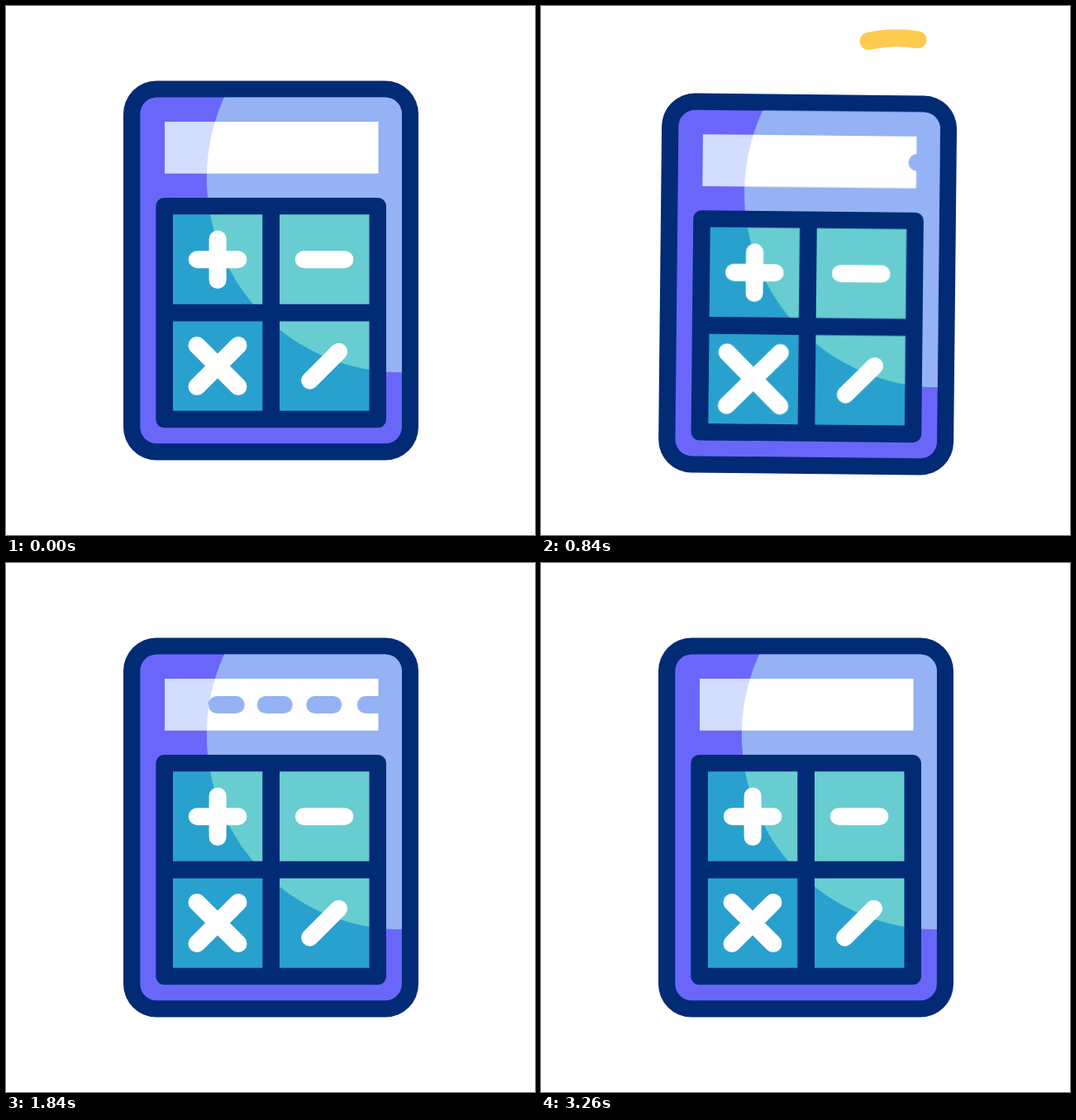
These frames come from a looping animation (640 by 640 pixels, 3460 ms). An HTML page:

```html
<!DOCTYPE html>
<html lang="en">
<head>
<meta charset="utf-8">
<title>Calculator</title>
<style>
  html, body { margin: 0; width: 100%; height: 100%; overflow: hidden; background: #fff; }
  svg { display: block; width: 100vw; height: 100vh; }

  svg { --loop: 3460ms; --ease: cubic-bezier(.333, 0, .667, 1); }
  .navy { fill: #022b76; }

  /* Unlit and lit colours of the same surfaces */
  #dim { --body: #6b66fa; --screen: #d3ddfe; --key: #28a1ce; }
  #lit { --body: #94b2f4; --screen: #fff; --key: #67cdd1; clip-path: url(#glow); }
  .body { fill: var(--body); }
  .screen { fill: var(--screen); }
  .keys { fill: var(--key); }

  .calc {
    transform-origin: 320.5px 525px;
    animation: hop var(--loop) var(--ease) infinite, tilt var(--loop) var(--ease) infinite;
  }
  @keyframes hop {
    0%, 6.65% { translate: 0 0; }
    14.65% { translate: 0 -52px; }
    23.58%, 27.89% { translate: 0 16.5px; }
    40.32%, 100% { translate: 0 0; }
  }
  @keyframes tilt {
    0%, 10.69% { rotate: 0deg; }
    19.94% { rotate: -4deg; }
    27.89% { rotate: 4deg; }
    40.32%, 100% { rotate: 0deg; }
  }

  /* Digits scroll across the screen */
  .digits { fill: var(--body); animation: scroll var(--loop) linear infinite; }
  @keyframes scroll {
    0%, 22.54% { transform: translateX(0); }
    94.22%, 100% { transform: translateX(-486.8px); }
  }

  /* Signs stretch one after another */
  .sign {
    fill: none; stroke: #fff; stroke-width: 21; stroke-linecap: round;
    vector-effect: non-scaling-stroke;
    transform-box: fill-box; transform-origin: center;
    animation: press var(--loop) var(--ease) calc(760ms + 244ms * var(--i)) infinite;
  }
  @keyframes press {
    0%, 7.23%, 100% { transform: scale(1); }
    3.61% { transform: scale(1.4); }
  }

  .swoosh {
    fill: none; stroke: #ffcb4f; stroke-width: 21; stroke-linecap: round;
    animation: sweep var(--loop) var(--ease) infinite, show var(--loop) step-end infinite;
  }
  @keyframes sweep {
    0%, 21.97% { stroke-dasharray: 0 200; stroke-dashoffset: 0; }
    30.3%, 33.53% { stroke-dasharray: 100 200; stroke-dashoffset: 0; }
    42.2%, 100% { stroke-dasharray: 100 200; stroke-dashoffset: -100; }
  }
  @keyframes show {
    0% { opacity: 0; }
    22.2% { opacity: 1; }
    42.1%, 100% { opacity: 0; }
  }
</style>
</head>
<body>
<svg viewBox="0 0 640 640">
  <defs>
    <clipPath id="glow"><circle cx="478" cy="208" r="235.2"/></clipPath>
    <clipPath id="window"><rect x="192" y="140" width="258.5" height="62.7"/></clipPath>
  </defs>

  <g class="calc">
    <rect class="navy" x="142" y="90.5" width="357" height="459" rx="40"/>
    <g id="dim">
      <rect class="body" x="162.3" y="110.6" width="316.6" height="418.7" rx="20"/>
      <rect class="screen" x="192" y="140" width="258.5" height="62.7"/>
      <g clip-path="url(#window)">
        <g class="digits">
          <rect x="453" y="161" width="44" height="21" rx="10.5"/>
          <rect x="512" y="161" width="43" height="21" rx="10.5"/>
          <rect x="571.5" y="161" width="43" height="21" rx="10.5"/>
          <rect x="633" y="161" width="41" height="21" rx="10.5"/>
        </g>
      </g>
      <rect class="navy" x="181.3" y="232" width="278.7" height="278.3" rx="10"/>
      <path class="keys" d="M202 252.3h108.3v108.4h-108.3zM331 252.3h108.5v108.4h-108.5zM202 381.5h108.3v108.3h-108.3zM331 381.5h108.5v108.3h-108.5z"/>
    </g>
    <path class="sign" style="--i:0" d="M231 410.5l50 50m0-50l-50 50"/>
    <path class="sign" style="--i:1" d="M231.3 306.7h49.6m-24.8-24.8v49.6"/>
    <path class="sign" style="--i:2" d="M360.3 306.7h49.6"/>
    <path class="sign" style="--i:3" d="M367.6 453.2l35-35"/>
  </g>

  <path class="swoosh" pathLength="100" d="M396 42.6A150 137.5 0 0 1 569.4 229"/>
</svg>
<script>
  // The lit layer repeats the surfaces inside the round highlight.
  const dim = document.getElementById('dim');
  const lit = dim.cloneNode(true);
  lit.id = 'lit';
  dim.after(lit);
</script>
</body>
</html>
```
